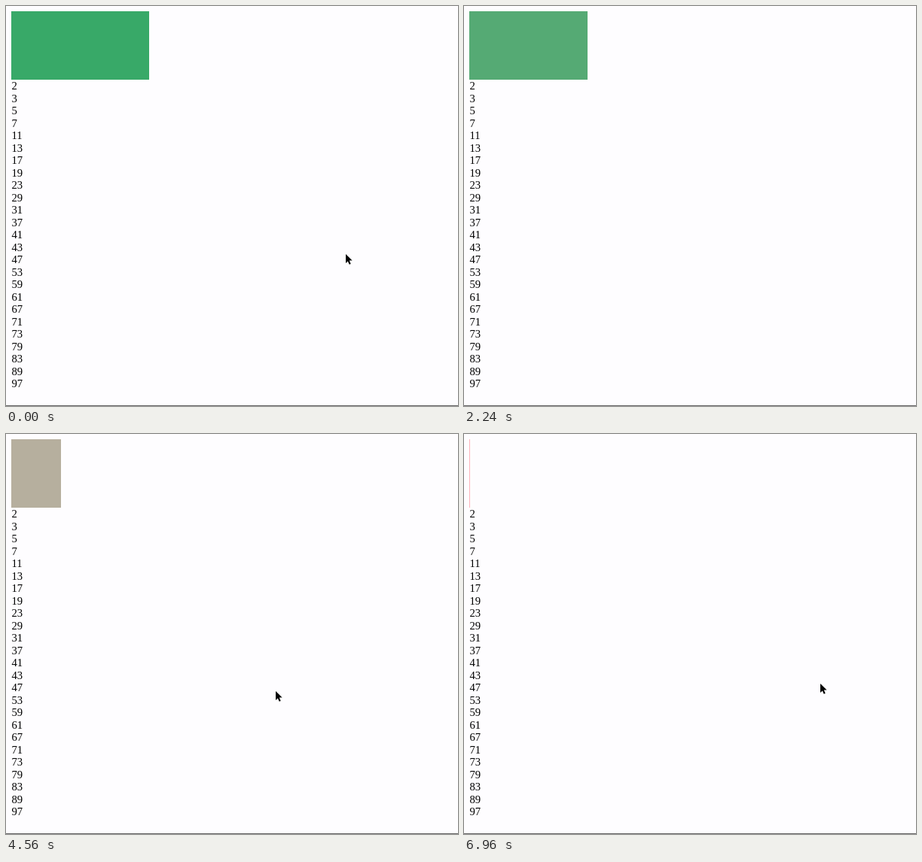
Write an HTML page that moves like this. It is 600 px wide and 532 px high and loops after 7000 ms.

```html
<!DOCTYPE html>
<html lang="en">
<head>
<meta charset="utf-8">
<title>Primes</title>
<style>
  html, body { margin: 0; width: 100%; height: 100%; overflow: hidden; background: #fefdff; }
  #box { position: absolute; left: 7.4px; top: 6.5px; height: 91.5px; }
  #list {
    position: absolute; left: 7.4px; top: 98px; margin: 0; color: #000;
    font: 14.67px/16.52px "Liberation Serif", Times, serif;
  }
  #edge { position: absolute; left: 0; top: 531px; width: 600px; height: 1px; background: #666; }
  #cursor { position: absolute; left: 0; top: 0; overflow: visible; }
</style>
</head>
<body>
<div id="box"></div>
<pre id="list"></pre>
<div id="edge"></div>
<svg id="cursor" width="10" height="17">
  <path d="M0 0V12L2.8 9.4L4.7 13.8L6.7 13L4.8 8.6H8.6Z" stroke="#fff" stroke-width="1.4" paint-order="stroke"/>
</svg>
<script>
const LOOP = 7000, STEP = 40, LEAD = 25;
const $ = id => document.getElementById(id);

const primes = [];
for (let n = 2; n < 100; n++) if (primes.every(p => n % p)) primes.push(n);
$('list').textContent = primes.join('\n');

// The box shrinks and grows, one second each way.
const pulse = $('box').animate([
  { width: '0px', backgroundColor: 'rgb(252,178,188)' },
  { width: '183.3px', backgroundColor: 'rgb(56,169,104)' }
], { duration: 1000, easing: 'ease-in-out', iterations: Infinity, direction: 'alternate-reverse' });
pulse.pause();

// Each path is one visit of the pointer: [time, x, y].
const visits = [
  [[0, 451, 330], [240, 451, 330], [720, 529, 272], [800, 570, 235]],
  [[1360, 570, 255], [1440, 556, 279], [1560, 556, 262]],
  [[2560, 517, 310], [2720, 490, 348], [2880, 510, 345], [3120, 590, 510]],
  [[3720, 577, 466], [4200, 358, 342], [5800, 358, 342], [6240, 587, 310],
   [6480, 575, 322], [6760, 473, 332], [LOOP, 473, 332]]
];

function pointerAt(t) {
  const path = visits.find(v => t >= v[0][0] && t <= v[v.length - 1][0]);
  if (!path) return null;
  const i = path.findIndex((p, k) => k && t <= p[0]);
  const [t0, x0, y0] = path[i - 1], [t1, x1, y1] = path[i];
  const u = (t - t0) / (t1 - t0), e = u * u * (3 - 2 * u);
  return [x0 + (x1 - x0) * e, y0 + (y1 - y0) * e];
}

function draw() {
  const t = Math.floor(performance.now() % LOOP / STEP) * STEP;
  pulse.currentTime = t + LEAD;
  const at = pointerAt(t), style = $('cursor').style;
  style.display = at ? '' : 'none';
  if (at) style.transform = `translate(${at[0]}px, ${at[1]}px)`;
  requestAnimationFrame(draw);
}
draw();
</script>
</body>
</html>
```
